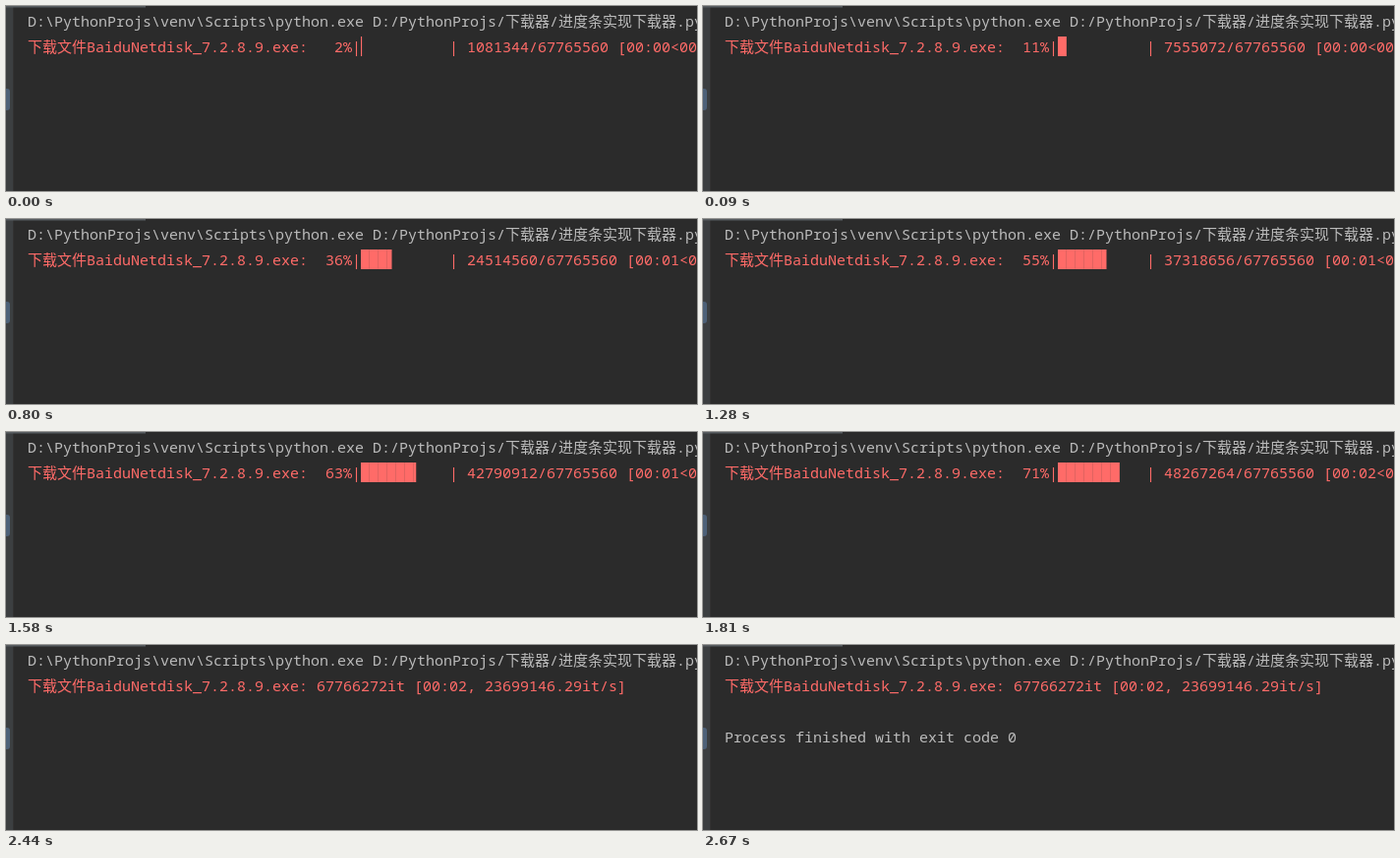
These frames come from a looping animation (703 by 188 pixels, 4.38 s). An HTML page:

```html
<!DOCTYPE html>
<html lang="zh">
<head>
<meta charset="utf-8">
<style>
  html, body { margin: 0; width: 100%; height: 100%; overflow: hidden; background: #2b2b2b; }
  svg { display: block; }
  text {
    font: 15px "Noto Sans Mono", "Noto Sans CJK SC", "Noto Sans CJK", monospace;
    font-variant-ligatures: none;
    white-space: pre;
    fill: #bbb;
  }
  .err { fill: #ff6b68; }
</style>
</head>
<body>
<svg width="703" height="188">
  <pattern id="cells" x="361" y="0" width="9" height="188" patternUnits="userSpaceOnUse">
    <rect width="9" height="188" fill="#ff6b68"/>
    <rect x="8.5" width=".5" height="188" fill="#c45a58"/>
  </pattern>
  <rect width="7" height="188" fill="#3c3f41"/>
  <rect x="7" width="1" height="188" fill="#323232"/>
  <rect width="142" height="1.5" fill="#595e62"/>
  <rect x="-4" y="84" width="8" height="22" rx="3" fill="#4d6178"/>
  <text x="22" y="21">D:\PythonProjs\venv\Scripts\python.exe D:/PythonProjs/下载器/进度条实现下载器.py</text>
  <text id="line" class="err" x="22" y="47"></text>
  <rect id="bar" x="361" y="31" height="20" fill="url(#cells)"/>
  <text id="exit" x="22" y="99">Process finished with exit code 0</text>
</svg>
<script>
const LOOP = 4380, DONE = 2440, EXIT = 2670;
const TOTAL = 67765560, CELLS = 10, CELL = 9;
const LABEL = '下载文件BaiduNetdisk_7.2.8.9.exe: ';

// [start in ms, KiB received, elapsed seconds]
const STEPS = [
  [0, 1056, 0], [90, 7378, 0], [410, 13696, 0], [570, 18818, 0],
  [800, 23940, 1], [1110, 30195, 1], [1280, 36444, 1], [1580, 41788, 1],
  [1810, 47136, 2], [2040, 52347, 2], [2210, 57548, 2]
];
const [line, bar, exit] = ['line', 'bar', 'exit'].map(id => document.getElementById(id));

function progressLine(bytes, seconds) {
  const percent = String(Math.round(100 * bytes / TOTAL)).padStart(3);
  return `${LABEL}${percent}%|${' '.repeat(CELLS)}| ${bytes}/${TOTAL} [00:0${seconds}<00:02`;
}

function draw(t) {
  const done = t >= DONE;
  const [, kib, seconds] = STEPS.findLast(step => step[0] <= t);
  const bytes = kib * 1024;
  const text = done ? LABEL + '67766272it [00:02, 23699146.29it/s]' : progressLine(bytes, seconds);
  if (line.textContent !== text) line.textContent = text;
  // The bar grows in eighths of a cell.
  const eighths = Math.floor(bytes / TOTAL * CELLS * 8);
  bar.setAttribute('width', done ? 0 : eighths * CELL / 8);
  exit.setAttribute('visibility', t >= EXIT ? 'visible' : 'hidden');
}

const start = performance.now();
function tick() {
  draw((performance.now() - start) % LOOP);
  requestAnimationFrame(tick);
}
tick();
</script>
</body>
</html>
```
